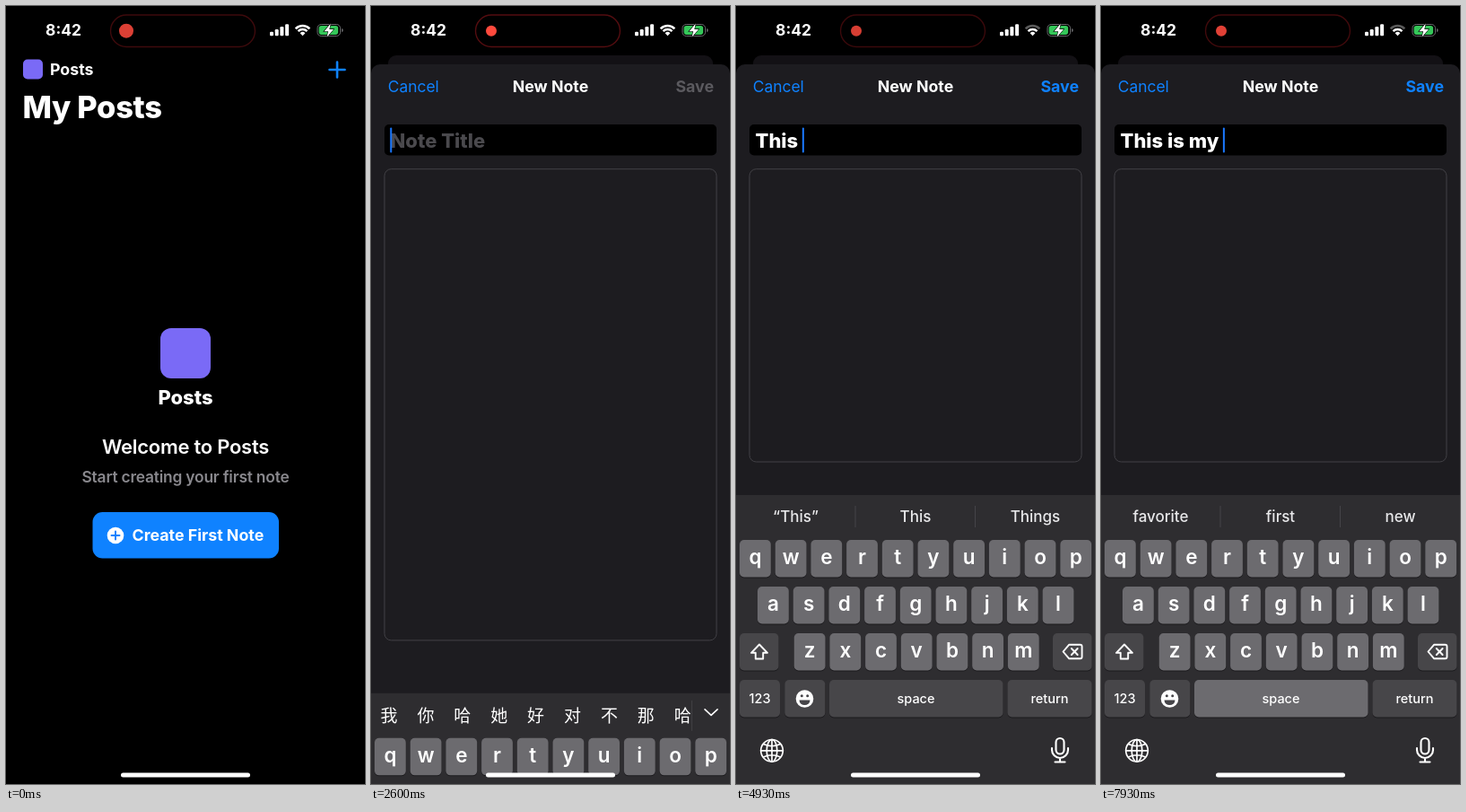
An HTML page that plays this animation: 400x867 px, repeating every 8 s.

```html
<!DOCTYPE html>
<html lang="en">
<head>
<meta charset="utf-8">
<title>New note</title>
<style>
  html, body { margin: 0; width: 100%; height: 100%; overflow: hidden; background: #000; }
  svg { display: block; width: 100%; height: 100%; }
  text { font-family: Inter, "Noto Sans CJK SC", "Noto Sans CJK", sans-serif; fill: #fff; font-size: 17.4px; }
  .mid { text-anchor: middle; }
  .b { font-size: 17.8px; font-weight: 700; }
  .t2 { font-size: 22px; font-weight: 800; }
  .blue { fill: #0f82ff; }
  .line { fill: none; stroke: #fff; stroke-width: 1.9; stroke-linecap: round; stroke-linejoin: round; }
  .key { fill: #6c6b6f; }
  .fn { fill: #474649; }
  .cap { font-size: 22.5px; font-weight: 600; }
  .small { font-size: 14.5px; font-weight: 500; }
  .hint { font-size: 17px; font-weight: 500; fill: #e8e8ea; }
  .cand { font-size: 19px; font-weight: 500; }
</style>
</head>
<body>
<svg viewBox="0 0 400 867">
  <rect width="400" height="867"/>

  <g id="home">
    <rect id="card" width="400" height="867"/>
    <g id="homeItems">
      <rect x="19" y="59.5" width="22" height="22" rx="5" fill="#7a6af6"/>
      <text class="b" x="49" y="77">Posts</text>
      <path id="plus" d="M360.500 71h17M369 62.500v17" stroke-width="2.600" stroke-linecap="round"/>
      <text x="18.500" y="125" style="font-size:34.5px;font-weight:800;letter-spacing:-.01em">My Posts</text>
      <rect x="172" y="359" width="56" height="56" rx="12" fill="#7a6af6"/>
      <text class="t2 mid" x="200" y="444">Posts</text>
      <text class="mid" x="200" y="498.500" style="font-size:22px;font-weight:600;letter-spacing:-.012em">Welcome to Posts</text>
      <text class="mid" x="200" y="531" style="font-weight:600;letter-spacing:-.012em;fill:#89888d">Start creating your first note</text>
      <rect x="96.500" y="564" width="207.500" height="51.500" rx="11" fill="#0f82ff"/>
      <circle cx="122" cy="590" r="9.300" fill="#fff"/>
      <path d="M117.500 590h9M122 585.500v9" stroke="#0f82ff" stroke-width="2" stroke-linecap="round"/>
      <text class="b" x="140.500" y="596">Create First Note</text>
    </g>
  </g>

  <g id="sheet">
    <rect y="65" width="400" height="900" rx="10" fill="#1d1c20"/>
    <text class="blue" x="18.800" y="96.300">Cancel</text>
    <text class="b mid" x="200" y="96">New Note</text>
    <text class="b" id="save" x="382" y="96.300" text-anchor="end">Save</text>
    <rect x="15" y="132" width="370" height="34.500" rx="5"/>
    <text class="t2" id="title" x="21.500" y="157.500"></text>
    <rect id="caret" y="135.500" width="2" height="28" rx="1" fill="#1a78ff"/>
    <rect id="editor" x="15" y="181.700" width="370" rx="7.500" fill="none" stroke="#424146"/>
  </g>

  <g id="board">
    <rect y="545" width="400" height="330" fill="#2e2d30"/>
    <g id="candidates">
      <clipPath id="candClip"><rect y="545" width="357" height="50"/></clipPath>
      <g id="candList" clip-path="url(#candClip)"></g>
      <path d="M357.500 553v34" stroke="#403f43"/>
      <path class="line" d="M372 563l7 6.500 7-6.500" style="stroke-width:1.600"/>
    </g>
    <g id="hints">
      <path d="M133 557v24M266.500 557v24" stroke="#454448"/>
    </g>
    <g id="keys"></g>
    <path id="shift" class="line" d="M26 711.500l-9 9.300h4.800v6.700h8.400v-6.700h4.800z"/>
    <path class="line" d="M371 711.800h12.500a2 2 0 0 1 2 2v11.400a2 2 0 0 1-2 2H371l-6.500-7.700zM373.800 716l6.800 7M380.600 716l-6.800 7"/>
    <circle cx="76.500" cy="772" r="9.800" fill="#fff"/>
    <path d="M70.500 773.500h12a6 5.500 0 0 1-12 0z" fill="#464549"/>
    <circle cx="73.300" cy="768.800" r="1.500" fill="#464549"/>
    <circle cx="79.700" cy="768.800" r="1.500" fill="#464549"/>
    <g class="line" style="stroke-width:1.700">
      <circle cx="40" cy="829.800" r="12.300"/>
      <ellipse cx="40" cy="829.800" rx="5.800" ry="12.300"/>
      <path d="M40 817.500v24.600M27.700 829.800h24.600M30.500 822.500q9.500 4.500 19 0M30.500 837q9.500-4.500 19 0"/>
    </g>
    <g class="line" style="stroke-width:2.100">
      <rect x="356.500" y="816" width="9" height="17.500" rx="4.500"/>
      <path d="M352 827v2a9 9 0 0 0 18 0v-2M361 838v4.500M355.500 842.500h11"/>
    </g>
  </g>

  <g id="status">
    <text class="mid" x="64" y="33" style="font-weight:700">8:42</text>
    <rect id="island" x="116.500" y="10" width="161" height="35.500" rx="17.700" stroke="#8c171b" stroke-width="1.400"/>
    <circle id="dot" cx="134" cy="27.700" fill="#ff4a3d"/>
    <g id="bars"></g>
    <path id="wifiOuter" d="M322.700 25.300a11 11 0 0 1 15.600 0" fill="none" stroke="#fff" stroke-width="2.600"/>
    <path d="M325.500 28.100a7.100 7.100 0 0 1 10 0" fill="none" stroke="#fff" stroke-width="2.500"/>
    <path d="M330.500 33.200l-2.900-3a4.100 4.100 0 0 1 5.800 0z" fill="#fff"/>
    <rect x="347" y="20.500" width="25.500" height="13" rx="4.200" fill="none" stroke="#69696c"/>
    <rect x="348.600" y="22.100" width="21.500" height="9.800" rx="2.800" fill="#35c759"/>
    <path d="M374 25v4.200q1.700-.6 1.700-2.100t-1.700-2.100z" fill="#69696c"/>
    <path d="M361.800 19.500l-7.300 8.700h4.600l-1.600 6.500 7.500-8.800h-4.700z" fill="#fff" stroke="#000" stroke-width="1.200" paint-order="stroke"/>
    <rect x="128" y="854.500" width="144" height="5" rx="2.500" fill="#fff"/>
  </g>
</svg>

<script>
const LOOP = 8000, SHEET_AT = 878, FOCUS_AT = 2530, ENGLISH_AT = 3750;
const LAG = 60;

// Each keystroke: time, character, then the suggestions that follow it.
const strokes = [
  [4030, 'T', '“T”', '', ''],
  [4390, 'h', '“Th”', 'The', 'This'],
  [4560, 'i', '“Thi”', 'This', 'Think'],
  [4720, 's', '“This”', 'This', 'Things'],
  [4920, ' ', 'is', 'was', 'one'],
  [5130, 'i', '“i”', 'is', 'in'],
  [5330, 's', '“is”', 'is', 'isn’t'],
  [5520, ' ', 'the', 'a', 'what'],
  [7200, 'm', '“m”', 'my', 'me'],
  [7480, 'y', '“my”', 'my', 'myself'],
  [7865, ' ', 'favorite', 'first', 'new']
];

const $ = id => document.getElementById(id);
const clamp = v => Math.max(0, Math.min(1, v));
const mix = (a, b, p) => a + (b - a) * p;
const spring = (ms, w = 14) => {
  const x = Math.max(0, ms) / 1000 * w;
  return 1 - (1 + x) * Math.exp(-x);
};

function add(parent, tag, attrs, text) {
  const el = document.createElementNS('http://www.w3.org/2000/svg', tag);
  for (const k in attrs) el.setAttribute(k, attrs[k]);
  if (text) el.textContent = text;
  return parent.appendChild(el);
}
const set = (id, attrs) => { for (const k in attrs) $(id).setAttribute(k, attrs[k]); };
const show = (id, on) => { $(id).style.display = on ? '' : 'none'; };

const keys = $('keys');
function key(x, y, w, cls) {
  add(keys, 'rect', { x, y: y + 1, width: w, height: 41.5, rx: 5, fill: '#1b1a1d' });
  return add(keys, 'rect', { x, y, width: w, height: 41.5, rx: 5, class: cls });
}
const label = (x, text, cls = 'small') => add(keys, 'text', { x, y: 777, class: cls + ' mid' }, text);

const letters = [];
[['qwertyuiop', 4], ['asdfghjkl', 24], ['zxcvbnm', 64.7]].forEach(([row, left], r) => {
  [...row].forEach((ch, i) => {
    const x = left + i * 39.7, y = 595 + r * 52;
    key(x, y, 34.8, 'key');
    letters.push(add(keys, 'text', { x: x + 17.4, y: y + 27.3, class: 'cap mid' }, ch));
  });
});
key(4, 699, 43.5, 'fn');
key(353, 699, 43.5, 'fn');
key(4, 751, 45, 'fn');
key(54.3, 751, 45, 'fn');
const spaceKey = key(104, 751, 193.5, 'key');
key(302.5, 751, 94, 'fn');
label(26.5, '123');
const spaceZh = label(200.5, '空格'), returnZh = label(349.5, '换行');
const spaceLang = label(200.5, 'English (US)'), spaceEn = label(200.5, 'space');
const returnEn = label(349.5, 'return');
spaceLang.style.fontSize = '14px';

[...'我你哈她好对不那哈'].forEach((ch, i) =>
  add($('candList'), 'text', { x: 20 + i * 40.9, y: 577, class: 'cand mid' }, ch));
const hints = [66.5, 200, 333.5].map(x => add($('hints'), 'text', { x, y: 575.3, class: 'hint mid' }));
[4.6, 7.3, 10.2, 13].forEach((h, i) =>
  add($('bars'), 'rect', { x: 294 + i * 5.7, y: 33.3 - h, width: 4, height: h, rx: 1.2, fill: '#fff' }));

function drawHome(p) {
  const s = mix(1, 0.905, p);
  set('home', { transform: `translate(${200 * (1 - s)} ${55 * p}) scale(${s})` });
  set('card', { rx: mix(40, 10, p), fill: `rgb(${19 * p},${17 * p},${21 * p})` });
  set('homeItems', { opacity: 1 - 0.55 * p });
  set('plus', { stroke: `rgb(${mix(15, 133, p)},${mix(130, 118, p)},${mix(255, 173, p)})` });
  set('sheet', { transform: `translate(0 ${802 * (1 - p)})` });
}

function drawTitle(t, typed) {
  const title = $('title'), text = typed.map(s => s[1]).join('');
  title.textContent = (text || 'Note Title').replace(/ /g, '\u00a0');
  title.style.fill = text ? '#fff' : '#4a494d';
  $('save').style.fill = text ? '#0f82ff' : '#5b5a5f';
  const since = t - (text ? typed[typed.length - 1][0] : FOCUS_AT);
  const beat = since % 1000;
  const glow = beat < 660 ? 1 - clamp((beat - 500) / 120) : clamp((beat - 720) / 130);
  set('caret', {
    x: 21.3 + (text ? title.getComputedTextLength() : 0),
    opacity: since < 0 ? 0 : glow
  });
}

function drawBoard(t, typed) {
  const p = spring(t - FOCUS_AT, 16), english = t >= ENGLISH_AT;
  set('board', { transform: `translate(0 ${322 * (1 - p)})` });
  set('editor', { height: mix(616.3, 326.3, p) });
  show('candidates', !english);
  show('hints', english);

  const caps = english && !typed.length;
  letters.forEach(el => {
    el.textContent = caps ? el.textContent.toUpperCase() : el.textContent.toLowerCase();
  });
  $('shift').style.fill = caps ? '#fff' : 'none';

  const settled = strokes.filter(s => s[0] + LAG <= t).pop();
  const words = settled ? settled.slice(2) : ['I', 'The', 'I’m'];
  hints.forEach((el, i) => { el.textContent = words[i]; });

  const last = typed[typed.length - 1];
  const pressed = last && last[1] === ' ' && t - last[0] < LAG;
  spaceKey.setAttribute('class', pressed ? 'fn' : 'key');
  const swap = clamp((t - 4600) / 300);
  spaceZh.style.opacity = returnZh.style.opacity = english ? 0 : 1;
  returnEn.style.opacity = english ? 1 : 0;
  spaceLang.style.opacity = english ? 0.75 * (1 - swap) : 0;
  spaceEn.style.opacity = swap;
}

function drawStatus(t) {
  const pulse = 0.5 + 0.5 * Math.cos((t - 1000) / 1600 * 2 * Math.PI);
  set('dot', { r: mix(8, 6, clamp((t - 130) / 500)), opacity: mix(0.84, 1, pulse) });
  set('island', { 'stroke-opacity': mix(0.42, 0.6, pulse) });
  set('wifiOuter', { opacity: t < 4000 ? 1 : 0.35 });
}

function frame(now) {
  const t = now % LOOP;
  const typed = strokes.filter(s => s[0] <= t);
  drawHome(spring(t - SHEET_AT));
  drawTitle(t, typed);
  drawBoard(t, typed);
  drawStatus(t);
  requestAnimationFrame(frame);
}
frame(0);
</script>
</body>
</html>
```
